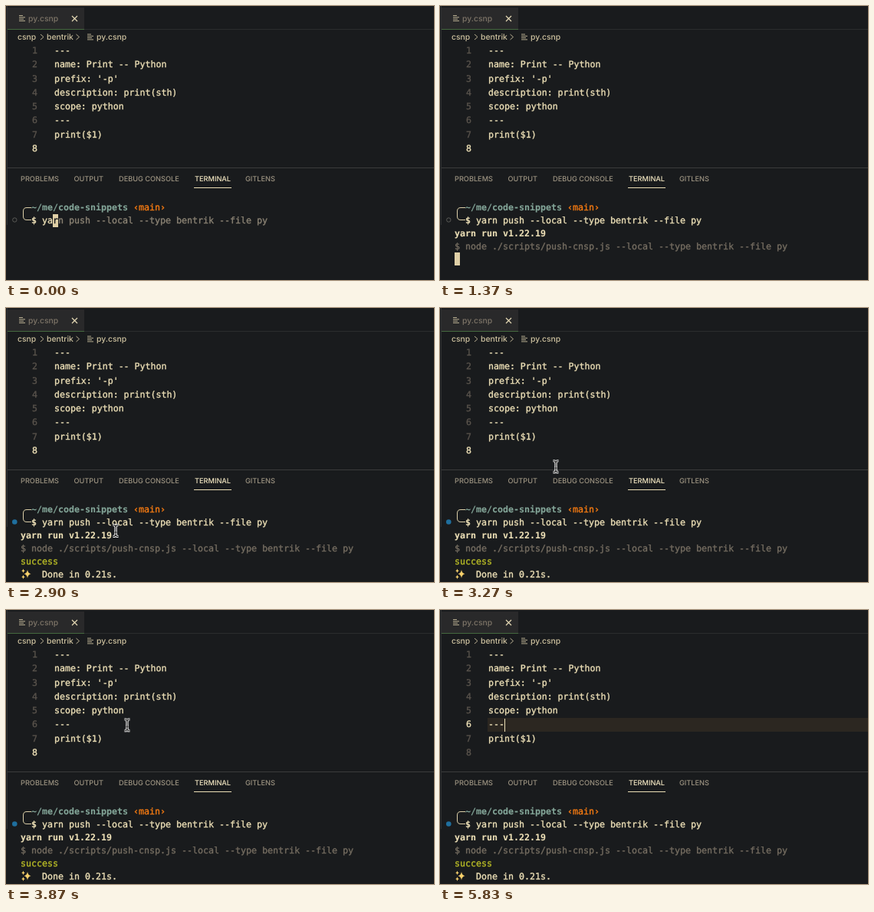
An HTML page for the animation above (5860 ms loop, 558 px wide and 358 px high).

```html
<!DOCTYPE html>
<html lang="en">
<head>
<meta charset="utf-8">
<title>Snippet push</title>
<style>
  :root {
    --bg: #191b1d;
    --fg: #ecdfb6;
    --ghost: #8b8374;
    --dim: #756d61;
    --gutter: #59534c;
    --cursor: #dfcfa6;
  }
  html, body { margin: 0; width: 100%; height: 100%; overflow: hidden; background: var(--bg); }
  svg { display: block; width: 558px; height: 358px; color: var(--fg); }
  text { fill: currentColor; white-space: pre; text-rendering: geometricPrecision; }
  tspan { fill: currentColor; stroke: currentColor; }
  .mono { font: 11.63px "DejaVu Sans Mono", monospace; }
  .code { font-size: 11.58px; }
  /* A hairline outline gives the heavier strokes of the screen font */
  .mono text { stroke: currentColor; stroke-width: .35px; }
  .mono .bold { font-weight: 700; stroke-width: .1px; }
  .ui { font: 500 10.4px Inter, sans-serif; }
  .tabs { font: 500 9.2px Inter, sans-serif; color: #9c9381; }
  .tabs .on { color: #f5e9c4; }
  .num { text-anchor: end; color: var(--gutter); }
  .crumb { color: #cfc3a0; }
  .line { fill: none; stroke: #b9af92; }

  /* One shared loop; hard changes use step-end */
  .step { animation: 5.86s step-end infinite; }

  #key-r { animation-name: key-r; }
  #key-n { animation-name: key-n; }
  #rest { animation-name: rest; }
  @keyframes key-r { 0% { color: var(--bg); } 2.4%, 100% { color: var(--fg); } }
  @keyframes key-n { 0% { color: var(--ghost); } 2.4% { color: var(--bg); } 5.1%, 100% { color: var(--fg); } }
  @keyframes rest { 0% { color: var(--ghost); } 8.9%, 100% { color: var(--fg); } }

  #block { animation-name: block; }
  @keyframes block {
    0% { transform: translate(61px, 272px); }
    2.4% { transform: translate(68px, 272px); }
    5.1% { transform: translate(75px, 272px); }
    8.9% { transform: translate(341px, 272px); }
    21.2% { transform: translate(19px, 289px); }
    22.2% { transform: translate(19px, 306px); }
    23% { transform: translate(19px, 322px); }
    25.6% { transform: translate(19px, 340px); }
    26.3%, 100% { transform: translate(19px, 400px); }
  }

  #version { animation-name: version; }
  #node { animation-name: node; color: var(--dim); }
  #success { animation-name: success; color: #b8bb26; }
  #done { animation-name: done; }
  #ok { animation-name: ok; }
  #idle { animation-name: idle; }
  @keyframes version { 0% { opacity: 0; } 22.2%, 100% { opacity: 1; } }
  @keyframes node { 0% { opacity: 0; } 23%, 100% { opacity: 1; } }
  @keyframes success { 0% { opacity: 0; } 25.6%, 100% { opacity: 1; } }
  @keyframes done { 0% { opacity: 0; } 26.3%, 100% { opacity: 1; } }
  @keyframes ok { 0% { opacity: 0; } 27.3%, 100% { opacity: 1; } }
  @keyframes idle { 0% { opacity: 1; } 27.3%, 100% { opacity: 0; } }

  #focus { animation-name: focus; }
  #n6 { animation-name: light; }
  #n8 { animation-name: unlight; }
  @keyframes focus { 0% { opacity: 0; } 67%, 100% { opacity: 1; } }
  @keyframes light { 0% { color: var(--gutter); } 67%, 100% { color: var(--fg); } }
  @keyframes unlight { 0% { color: var(--fg); } 67%, 100% { color: var(--gutter); } }

  #mouse {
    animation: move 5.86s ease-in-out infinite, seen 5.86s step-end infinite;
  }
  @keyframes move {
    0%, 42.7% { transform: translate(140px, 306px); }
    49.5%, 51% { transform: translate(143px, 291px); }
    59.7%, 65% { transform: translate(156.5px, 149.5px); }
    70% { transform: translate(172px, 158.5px); }
    79.7%, 100% { transform: translate(181px, 159.5px); }
  }
  @keyframes seen { 0% { opacity: 0; } 43% { opacity: 1; } 88%, 100% { opacity: 0; } }
</style>
</head>
<body>
<svg viewBox="0 0 558 358">
  <defs>
    <path id="file" d="M0 .5H5M0 2.8H8M0 5.1H6M0 7.4H8" stroke-width="1"/>
    <path id="chevron" d="M0 0L4 3.5L0 7"/>
    <path id="spark" d="M0-6Q.8-.8 5 0Q.8.8 0 6Q-.8.8-5 0Q-.8-.8 0-6Z"/>
    <path id="beam" d="M-3.5-7.5Q-.5-7.5 0-5.5Q.5-7.5 3.5-7.5M0-5.5V5.5M-3.5 7.5Q-.5 7.5 0 5.5Q.5 7.5 3.5 7.5M-2 2H2" fill="none"/>
  </defs>

  <rect width="558" height="358" fill="#191b1d"/>
  <path d="M1.5 0V286" stroke="#303233"/>

  <!-- File tab -->
  <rect x="2" y="2" width="100" height="28" fill="#29292a"/>
  <path d="M102 30.5H558" stroke="#2b2d2e"/>
  <path d="M2 30.5H102" stroke="#45693f"/>
  <use href="#file" x="17" y="12" class="line"/>
  <text class="ui" x="29" y="20" style="color:#7e7568">py.csnp</text>
  <path d="M86 13L93 20M93 13L86 20" stroke="#e4d8b4" stroke-width="1.2"/>

  <!-- Breadcrumbs -->
  <g class="ui crumb">
    <text x="15" y="44">csnp</text>
    <use href="#chevron" x="45" y="37" class="line"/>
    <text x="53" y="44">bentrik</text>
    <use href="#chevron" x="91.5" y="37" class="line"/>
    <use href="#file" x="106" y="36.5" class="line"/>
    <text x="118" y="44">py.csnp</text>
  </g>

  <!-- Editor -->
  <g id="focus" class="step">
    <rect x="62" y="141" width="496" height="18" fill="#2c2721"/>
    <rect x="84" y="142" width="1" height="17" fill="#ecdfb6"/>
  </g>
  <g class="mono code num">
    <text x="41" y="62">1</text>
    <text x="41" y="80.2">2</text>
    <text x="41" y="98.5">3</text>
    <text x="41" y="116.8">4</text>
    <text x="41" y="135">5</text>
    <text x="41" y="153.4" id="n6" class="step">6</text>
    <text x="41" y="171.7">7</text>
    <text x="41" y="190" id="n8" class="step">8</text>
  </g>
  <g class="mono code">
    <text x="63" y="62">---</text>
    <text x="63" y="80.2">name: Print -- Python</text>
    <text x="63" y="98.5">prefix: '-p'</text>
    <text x="63" y="116.8">description: print(sth)</text>
    <text x="63" y="135">scope: python</text>
    <text x="63" y="153.4">---</text>
    <text x="63" y="171.7">print($1)</text>
  </g>

  <!-- Panel tabs -->
  <path d="M2 211.5H558" stroke="#3b3c3c"/>
  <g class="tabs">
    <text x="19" y="229">PROBLEMS</text>
    <text x="88.5" y="229">OUTPUT</text>
    <text x="147" y="229">DEBUG CONSOLE</text>
    <text x="246" y="229" class="on">TERMINAL</text>
    <text x="312" y="229">GITLENS</text>
  </g>
  <path d="M245 237.5H294" stroke="#ecdfb6"/>

  <!-- Terminal -->
  <circle id="idle" class="step" cx="11.3" cy="279.5" r="2.7" fill="none" stroke="#5b5b58"/>
  <circle id="ok" class="step" cx="11.3" cy="279.5" r="3.3" fill="#1f6f9e"/>
  <path d="M33 263.5H27Q22.5 263.5 22.5 268V275Q22.5 279.5 27 279.5H33" fill="none" stroke="#dccfa8"/>
  <rect id="block" class="step" width="7" height="17" fill="#dfcfa6"/>
  <g class="mono">
    <text x="33" y="267" class="bold" style="color:#83a598">~/me/code-snippets</text>
    <text x="166" y="267" style="color:#f47a12">‹main›</text>
    <text x="33" y="284" class="bold">$</text>
    <text x="47" y="284">ya<tspan id="key-r" class="step">r</tspan><tspan id="key-n" class="step">n</tspan><tspan id="rest" class="step"> push --local --type bentrik --file py</tspan></text>
    <text x="19" y="301" id="version" class="step bold">yarn run v1.22.19</text>
    <text x="19" y="318" id="node" class="step">$ node ./scripts/push-cnsp.js --local --type bentrik --file py</text>
    <text x="19" y="335" id="success" class="step">success</text>
    <g id="done" class="step">
      <g fill="#f7cf6b">
        <use href="#spark" transform="translate(28 347.5) scale(.9)"/>
        <use href="#spark" transform="translate(22.5 343.5) scale(.45)"/>
        <use href="#spark" transform="translate(22.5 351.5) scale(.45)"/>
      </g>
      <text x="47" y="352">Done in 0.21s.</text>
    </g>
  </g>

  <g id="mouse">
    <use href="#beam" stroke="#fff" stroke-width="3.2"/>
    <use href="#beam" stroke="#111" stroke-width="1.1"/>
  </g>
</svg>
</body>
</html>
```
